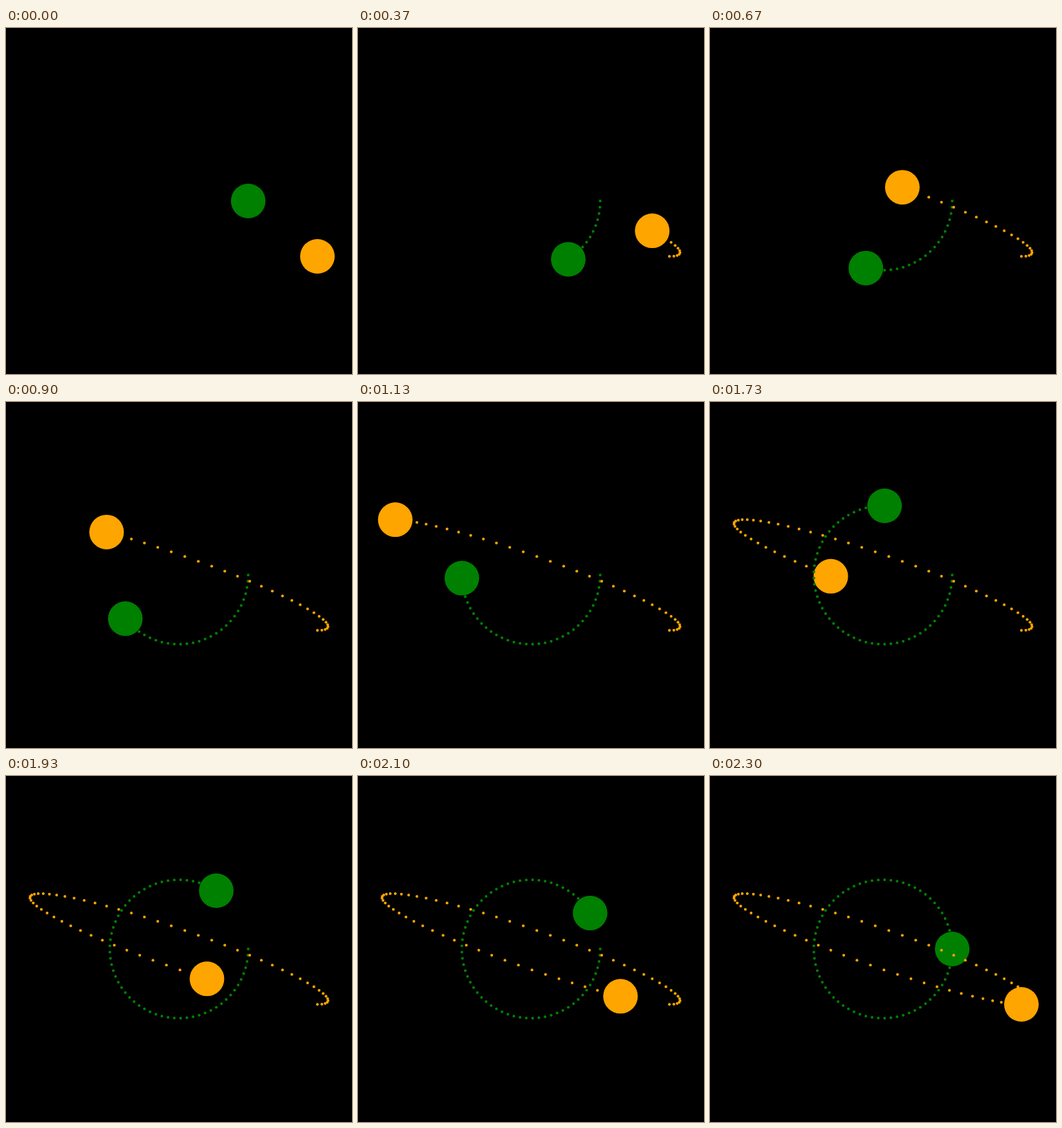
Recreate the animation shown at these times as an HTML page with a canvas. Size 500x500 px, loop 2330 ms.

```html
<!DOCTYPE html>
<html>
<head>
<meta charset="utf-8">
<style>
  html, body { margin: 0; width: 100%; height: 100%; overflow: hidden; background: #000; }
  canvas { display: block; }
</style>
</head>
<body>
<canvas id="stage" width="500" height="500"></canvas>
<script>
const ctx = document.getElementById('stage').getContext('2d');
const LOOP = 2330, STEPS = 69;

const orbits = [
  { color: 'green', at: a => [250 + 100 * Math.cos(a), 250 + 100 * Math.sin(a)] },
  { color: 'orange', at: a => [250 + 200 * Math.cos(a) + 80 * Math.sin(a), 250 + 80 * Math.cos(a)] }
];

function disc(orbit, step, radius) {
  const [x, y] = orbit.at(2 * Math.PI * step / STEPS);
  ctx.fillStyle = orbit.color;
  ctx.beginPath();
  ctx.arc(x, y, radius, 0, 2 * Math.PI);
  ctx.fill();
}

// 30 steps per second, each starting on a multiple of 10 ms
const stepAt = ms => Math.floor((3 * Math.floor(ms / 10) + 1) / 10);

function draw() {
  const step = stepAt(performance.now() % LOOP);
  ctx.fillStyle = '#000';
  ctx.fillRect(0, 0, 500, 500);
  for (const orbit of orbits) disc(orbit, step, 25);
  for (const orbit of orbits)
    for (let i = 0; i <= step; i++) disc(orbit, i, 2);
  requestAnimationFrame(draw);
}
draw();
</script>
</body>
</html>
```
